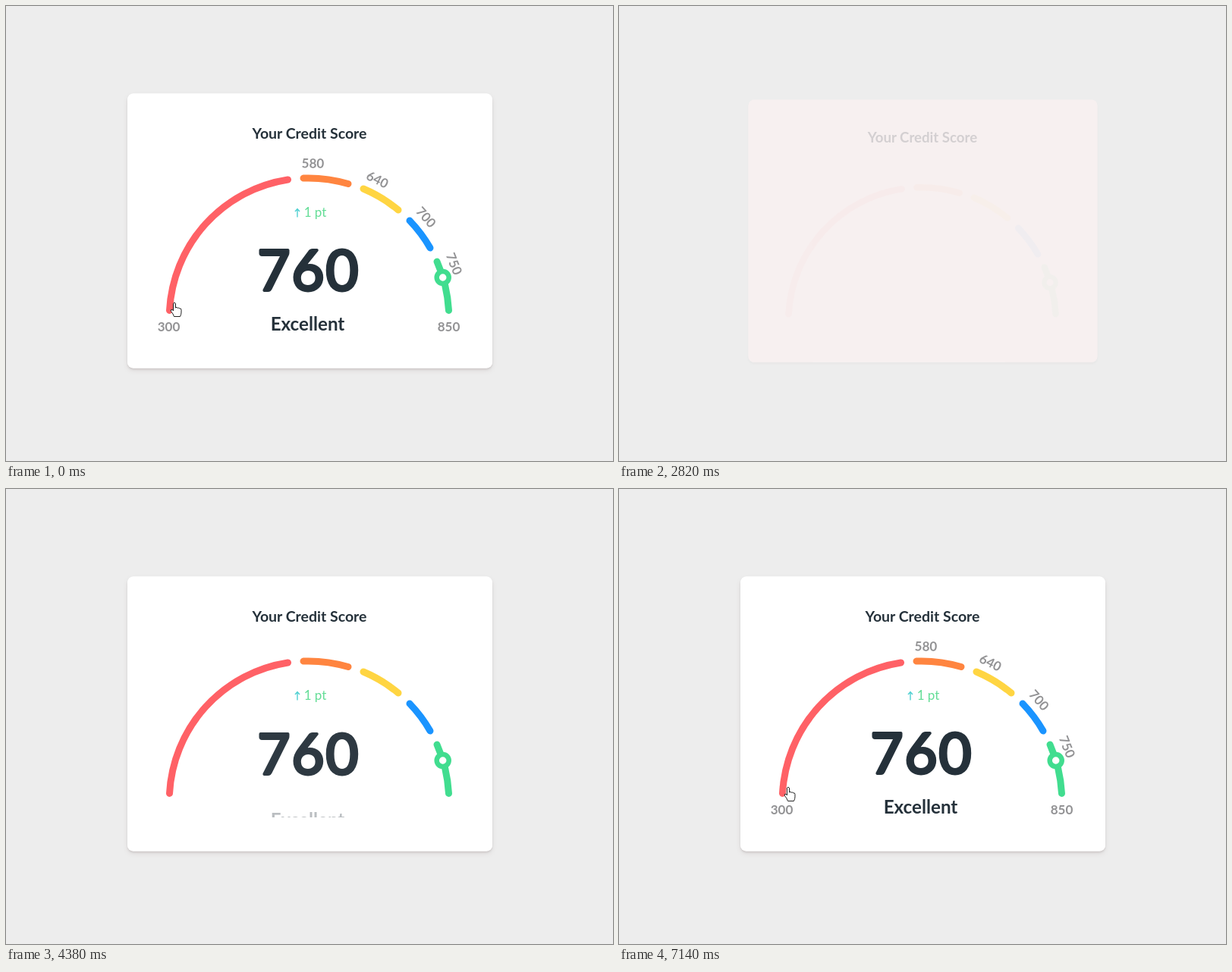
Write an HTML page that moves like this. It is 800x600 px and loops after 7200 ms.

```html
<!DOCTYPE html>
<html lang="en">
<head>
<meta charset="utf-8">
<title>Credit score</title>
<style>
  html, body { margin: 0; width: 100%; height: 100%; overflow: hidden; background: #ededed; }
  svg { display: block; font-family: Lato, "Open Sans", sans-serif; }
  text { text-anchor: middle; fill: #25313a; font-weight: 700; }
  #shadow { filter: drop-shadow(0 2px 1px #3010101c) drop-shadow(0 3px 3px #30101014); }
  #gauge path { fill: none; stroke-width: 9; stroke-linecap: round; }
  #labels text { fill: #929294; font-size: 17px; }
  #score text { font-size: 74px; font-weight: 400; letter-spacing: 2.1px;
    stroke: #25313a; stroke-width: 4; stroke-linejoin: round; }
  #change text { font-size: 17px; font-weight: 400; fill: #63dd96; }
  #cursor path { fill: #fff; stroke: #222; stroke-linejoin: round; }
</style>
</head>
<body>
<svg width="800" height="600" viewBox="0 0 800 600">
  <defs>
    <clipPath id="changeClip"><path d="M360 255H440V301H360Z"/></clipPath>
    <clipPath id="scoreClip"><path d="M300 300H500V392H300Z"/></clipPath>
    <clipPath id="ratingClip"><path d="M300 400H500V433H300Z"/></clipPath>
  </defs>
  <g id="card">
    <rect id="shadow" x="160" y="115.5" width="481" height="362" rx="8" fill="#fff"/>
    <rect id="face" x="160" y="115.5" width="481" height="362" rx="8"/>
    <text id="title" x="400" y="175" font-size="19.5">Your Credit Score</text>
    <g id="gauge"></g>
    <g clip-path="url(#changeClip)"><g id="change">
      <path d="M384 278.5V267.5M381 271L384 267.5L387 271" fill="none" stroke="#50d0d2" stroke-width="1.4"/>
      <text x="407.5" y="278">1 pt</text>
    </g></g>
    <g clip-path="url(#scoreClip)"><g id="score"><text x="399" y="374.5">760</text></g></g>
    <g clip-path="url(#ratingClip)"><g id="rating"><text x="397.5" y="428" font-size="24.2">Excellent</text></g></g>
    <g id="labels"></g>
  </g>
  <g id="cursor">
    <path id="arrow" d="M0 0V13.2L3 10.4L5.2 15.5L7.4 14.5L5.2 9.6H9.2Z"/>
    <path id="hand" d="M-1.5 11V1.2Q0 -1 1.5 1.2V7Q3 5.5 4.3 7.3Q6 6.3 6.9 8Q9 7.4 9 9.6V13Q9 15.5 7.5 18.5H-.5Q-1.5 15 -4.6 11.5Q-5 8.5 -2.8 9.3L-1.5 11Z"/>
  </g>
</svg>
<script>
const LOOP = 7200, RELOAD = 2820;
const $ = id => document.getElementById(id);
const clamp = v => Math.min(1, Math.max(0, v));
const ramp = (t, start, length) => clamp((t - start) / length);
const easeOut = p => 1 - (1 - p) ** 2;

// Gauge segments: start point, end point, colour
const segments = [
  [215.5, 401.5, 371.5, 229, '#ff6166'],
  [392, 227, 451, 234.5, '#ff8540'],
  [471, 241, 517, 269, '#ffd542'],
  [532, 283, 559, 319, '#1a94ff'],
  [568, 337, 583.5, 401.5, '#41dd8f']
];
$('gauge').innerHTML = segments.map(([x1, y1, x2, y2, color]) =>
  `<path d="M${x1} ${y1}A184.4 184.4 0 0 1 ${x2} ${y2}" stroke="${color}"/>`).join('') +
  '<circle cx="575.7" cy="358" r="8" fill="#fff" stroke="#41dd8f" stroke-width="6.5"/>';

// Scale labels: value, centre, rotation
const labels = [
  [300, 214.5, 422.5, 0], [580, 404.5, 207.5, 1], [640, 489.5, 229, 27],
  [700, 553.5, 278.5, 48], [750, 590.5, 340, 68], [850, 583.5, 422.5, 0]
];
$('labels').innerHTML = labels.map(([value, x, y, angle]) =>
  `<text transform="translate(${x} ${y}) rotate(${angle})" y="6">${value}</text>`).join('');

// Parts that rise into place: id, start time, distance
const reveals = [
  ['gauge', 2810, 10], ['change', 3290, 23], ['score', 3770, 42], ['rating', 4250, 25]
];

// Cursor route: time, x, y
const route = [
  [0, 222, 391], [500, 222, 391], [750, 192, 392], [900, 60, 400], [965, -15, 405],
  [4990, -15, 468], [5040, 18, 474], [5280, 139, 491], [5500, 203, 440], [5790, 224, 404],
  [6540, 225, 398], [7140, 223, 393], [LOOP, 222, 391]
];

function cursorAt(t) {
  const i = route.findIndex(point => point[0] > t);
  const [t0, x0, y0] = route[i - 1], [t1, x1, y1] = route[i];
  const p = (t - t0) / (t1 - t0);
  return [x0 + (x1 - x0) * p, y0 + (y1 - y0) * p];
}

function draw(now) {
  const t = now % LOOP;
  const entering = t >= RELOAD;

  const p = entering ? easeOut(ramp(t, 2787, 400)) : 1;
  const scale = 0.948 + 0.052 * p;
  $('card').setAttribute('transform', `translate(400 297) scale(${scale}) translate(-400 -297)`);
  $('face').setAttribute('fill', `rgb(${245 + 10 * p},${237 + 18 * p},${237 + 18 * p})`);
  $('shadow').setAttribute('opacity', p);
  $('title').setAttribute('opacity', p);

  for (const [id, start, distance] of reveals) {
    const shown = entering ? easeOut(ramp(t, start, 770)) : 1;
    $(id).setAttribute('opacity', shown);
    $(id).setAttribute('transform', `translate(0 ${distance * (1 - shown)})`);
  }

  $('labels').setAttribute('opacity', t < RELOAD ? 1 - ramp(t, 790, 300) : ramp(t, 5380, 300));

  const [x, y] = cursorAt(t);
  $('cursor').setAttribute('transform', `translate(${x} ${y})`);
  $('hand').setAttribute('visibility', x > 195 ? 'visible' : 'hidden');
  $('arrow').setAttribute('visibility', x > 195 ? 'hidden' : 'visible');
}

const begin = performance.now();
function tick() {
  draw(performance.now() - begin);
  requestAnimationFrame(tick);
}
tick();
</script>
</body>
</html>
```
